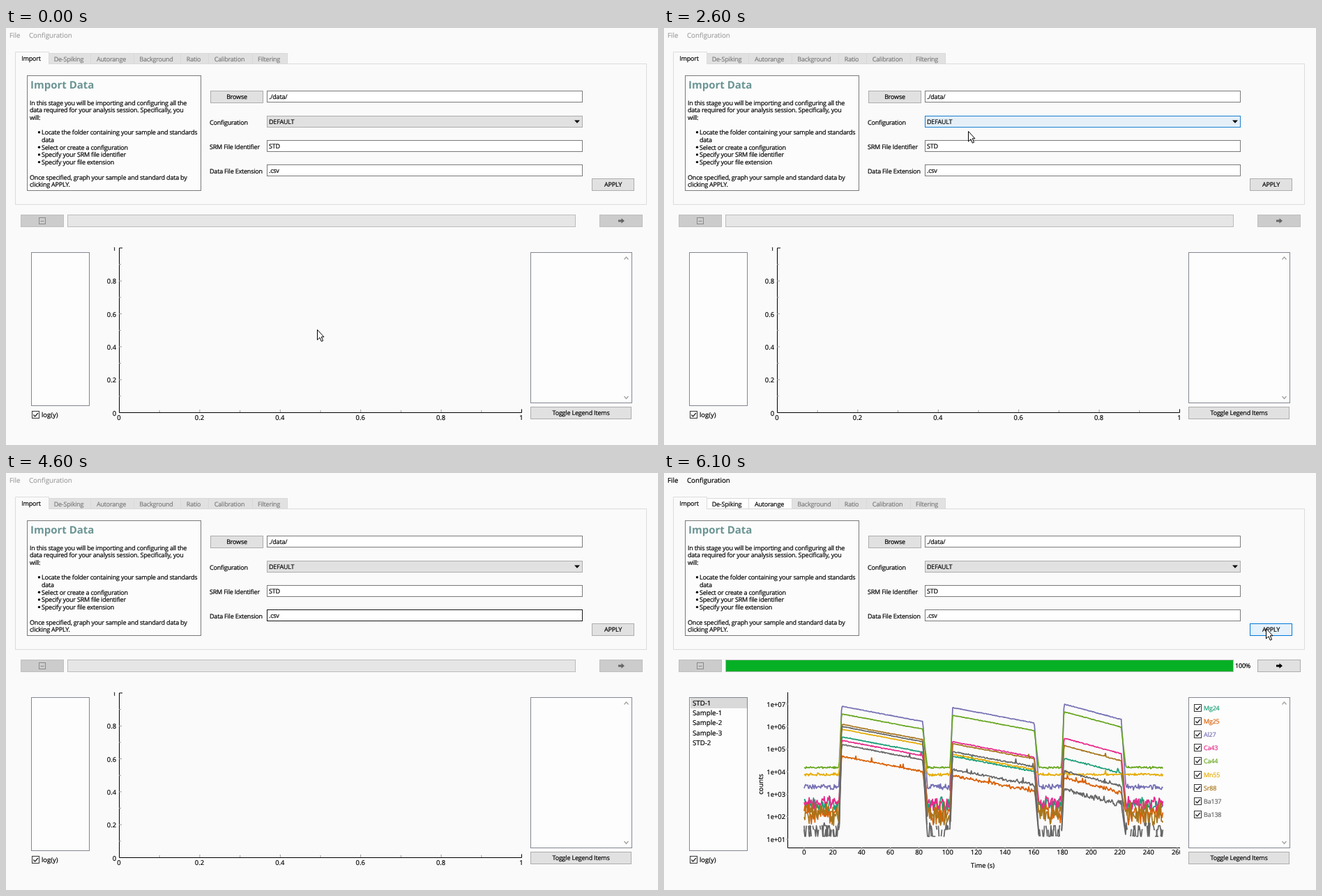
These frames come from a looping animation (935x599 px, 8 s). An HTML page:

```html
<!DOCTYPE html>
<html lang="en">
<head>
<meta charset="utf-8">
<title>Import Data</title>
<style>
  html, body { margin: 0; width: 100%; height: 100%; overflow: hidden; background: #fafafa; }
  svg { display: block; }
  text {
    font: 9px "Open Sans", "Noto Sans", sans-serif; letter-spacing: -.2px;
    fill: currentColor; stroke: currentColor; stroke-width: .2px;
    text-rendering: geometricPrecision; white-space: pre;
  }
  .big { font-size: 9.7px; letter-spacing: 0; }
  .axis { font-size: 9.4px; letter-spacing: 0; }
  .head { font-size: 15px; font-weight: 700; letter-spacing: 0; stroke: none; }
</style>
</head>
<body>
<svg id="stage" width="935" height="599" viewBox="0 0 935 599"></svg>
<script>
const LOOP = 8000, STEP = 100;
const BG = '#fafafa', FACE = '#e1e1e1', EDGE = '#adadad', FRAME = '#7a7a7a', MUTED = '#7c7c7c';
const stage = document.getElementById('stage');

// ---- drawing helpers ----
function add(parent, tag, attrs, content) {
  const el = document.createElementNS('http://www.w3.org/2000/svg', tag);
  for (const k in attrs) el.setAttribute(k, attrs[k]);
  if (content !== undefined) el.textContent = content;
  return parent.appendChild(el);
}
const group = (attrs = {}, parent = stage) => add(parent, 'g', attrs);
const box = (p, x, y, w, h, fill, stroke) =>
  add(p, 'rect', { x: x + .5, y: y + .5, width: w - 1, height: h - 1, fill, stroke });
const label = (p, x, y, str, cls = '', color = '#000', anchor = 'start') =>
  add(p, 'text', { x, y, class: cls, color, 'text-anchor': anchor }, str);
const line = (p, d, stroke = '#000', width = 1) =>
  add(p, 'path', { d, stroke, 'stroke-width': width, fill: 'none', 'stroke-linejoin': 'round' });
const shape = (p, d, fill = '#000') => add(p, 'path', { d, fill });

function checkbox(p, x, y) {
  box(p, x, y, 11, 11, '#fff', '#333');
  line(p, `M${x + 2.3} ${y + 5.5}l2.3 2.5 4.3-5`, '#222', 1.2);
}
function button(x, y, w, h, str) {
  const face = box(stage, x, y, w, h, FACE, EDGE);
  label(stage, x + w / 2, y + h / 2 + 3.3, str, '', '#000', 'middle');
  return face;
}

// ---- menu and tabs ----
const menu = [label(stage, 5, 14, 'File', 'big'), label(stage, 33, 14, 'Configuration', 'big')];

box(stage, 13, 51, 906, 203, BG, '#dcdcdc');
const tabEdges = [61, 121, 183, 250, 290, 353, 403];
const tabs = ['De-Spiking', 'Autorange', 'Background', 'Ratio', 'Calibration', 'Filtering'].map((name, i) => {
  const x = tabEdges[i], w = tabEdges[i + 1] - x;
  return {
    face: box(stage, x, 36, w + 1, 16, FACE, '#d9d9d9'),
    text: label(stage, x + w / 2 - 1, 47.5, name, '', MUTED, 'middle')
  };
});
shape(stage, 'M13 34H61V52H13Z', BG);
line(stage, 'M13.5 52V34.5H61.5V51.5', '#dcdcdc');
label(stage, 36, 47, 'Import', '', '#000', 'middle');

// ---- instructions ----
box(stage, 30, 68, 250, 166, '#fcfcfc', FRAME);
label(stage, 35, 87, 'Import Data', 'head', '#6b9594');
`In this stage you will be importing and configuring all the
data required for your analysis session. Specifically, you
will:

*Locate the folder containing your sample and standards
_data
*Select or create a configuration
*Specify your SRM file identifier
*Specify your file extension

Once specified, graph your sample and standard data by
clicking APPLY.`.split('\n').forEach((str, i) => {
  const y = 110.5 + 10.7 * i, item = /^[*_]/.test(str);
  label(stage, item ? 51 : 34, y, item ? str.slice(1) : str);
  if (str[0] === '*') add(stage, 'circle', { cx: 47.5, cy: y - 3.5, r: 1.7 });
});

// ---- form ----
const beam = group();
line(beam, 'M-3 -7.5H3M-3 7.5H3M0 -7.5V7.5', '#fff');

button(293, 90, 76, 18, 'Browse');
const field = (y, str) => {
  const face = box(stage, 374, y, 453, 17, '#fff', FRAME);
  label(stage, 377, y + 12.2, str);
  return face;
};
const data = field(90, './data/');
const combo = field(126, 'DEFAULT');
const srm = field(161, 'STD');
const ext = field(196, '.csv');
shape(stage, 'M815 132.5H823L819 136.8Z');
['Configuration', 'SRM File Identifier', 'Data File Extension'].forEach((str, i) =>
  label(stage, 292, 138.5 + 35 * i, str));
const apply = button(840, 216, 61, 18, 'APPLY');

// ---- progress row ----
box(stage, 21, 268, 62, 18, '#ccc', '#bfbfbf');
box(stage, 47, 272, 10, 10, 'none', '#8a8a8a');
line(stage, 'M49.5 277.5H54.5', '#8a8a8a');
box(stage, 88, 268, 729, 18, '#e6e6e6', '#bcbcbc');
const bar = add(stage, 'rect', { x: 89, y: 269, height: 16, fill: '#06b025' });
const percent = label(stage, 819, 280.3, '');
const next = box(stage, 851, 268, 62, 18, '#ccc', '#bfbfbf');
const arrow = shape(stage, 'M878 275.5H882.5V273.3L887 277L882.5 280.7V278.5H878Z');

// ---- side panels ----
box(stage, 36, 322, 84, 221, '#fdfdfd', '#828790');
checkbox(stage, 37, 550);
label(stage, 51, 558.7, 'log(y)', 'axis');
box(stage, 752, 322, 146, 217, '#fdfdfd', '#828790');
line(stage, 'M886.5 332.5L889.5 329L892.5 332.5M886.5 529L889.5 532.5L892.5 529', '#a0a0a0', 1.2);
button(752, 544, 145, 18, 'Toggle Legend Items');

// ---- empty plot ----
const clip = add(add(stage, 'defs', {}), 'clipPath', { id: 'clip' });
add(clip, 'rect', { x: 125, y: 315, width: 615, height: 260 });
const blank = group({ 'clip-path': 'url(#clip)' });
line(blank, 'M167 316H162.5V552.5H739.5V547.5');
for (let i = 0; i <= 10; i++) {
  const x = 162.5 + 57.7 * i, y = 552.5 - 23.65 * i;
  if (i % 10) line(blank, `M162 ${y}h${i % 2 ? 3 : 4}M${x} 552v${i % 2 ? -3 : -4}`, '#999');
  if (i % 2 === 0) {
    label(blank, 158, y + 4, i / 10, 'axis', '#000', 'end');
    label(blank, x - .5, 562.5, i / 10, 'axis', '#000', 'middle');
  }
}

// ---- loaded data ----
const loaded = group();
shape(loaded, 'M38 323H119V338H38Z', '#d9d9d9');
['STD-1', 'Sample-1', 'Sample-2', 'Sample-3', 'STD-2'].forEach((s, i) =>
  label(loaded, 41, 334 + 14.2 * i, s, 'big'));

const plot = group({ 'clip-path': 'url(#clip)' }, loaded);
const DECADE = 32.35, ONE = 522;
const px = sec => 201 + 2.0575 * sec;
line(plot, 'M177.5 315V538.5H740');
for (let e = 1; e <= 7; e++) {
  const y = 558.4 - DECADE * e;
  line(plot, `M178 ${y}h-3`, '#999');
  label(plot, 174, y + 3.7, '1e+0' + e, 'axis', '#000', 'end');
}
for (let s = 0; s <= 260; s += 20) {
  line(plot, `M${px(s)} 538v3`, '#999');
  label(plot, px(s), 548.3, s, 'axis', '#000', 'middle');
}
label(plot, 457, 567, 'Time (s)', 'axis', '#000', 'middle');
add(plot, 'text', { class: 'axis', 'text-anchor': 'middle', transform: 'translate(142 447) rotate(-90)' }, 'counts');

// base: level between pulses, top: start of the first pulse,
// rare: how much weaker the element is in the later pulses
const series = [
  { name: 'Mg24', color: '#1b9e77', base: 477, top: 379, rare: .5 },
  { name: 'Mg25', color: '#d95f02', base: 488, top: 407, rare: .5 },
  { name: 'Al27', color: '#7570b3', base: 451, top: 335, rare: 0 },
  { name: 'Ca43', color: '#e7298a', base: 474, top: 384, rare: 0 },
  { name: 'Ca44', color: '#66a61e', base: 423, top: 346, rare: 0 },
  { name: 'Mn55', color: '#e6ab02', base: 433, top: 368, rare: 1 },
  { name: 'Sr88', color: '#a6761d', base: 490, top: 361, rare: .5 },
  { name: 'Ba137', color: '#666666', base: ONE, top: 390, rare: 1 },
  { name: 'Ba138', color: '#666666', base: ONE, top: 364, rare: 1 }
];
const RISE = 1.8, FALL = 3.2, DROP = 22;
const pulses = [
  { on: 24.3, off: 82.7, shift: () => 0 },
  { on: 101.6, off: 160.4, shift: r => 2 + 34 * r ** .4 },
  { on: 179.3, off: 221, shift: r => -3 + 67 * r }
];

let seed = 11;
const rnd = () => (seed = seed * 16807 % 2147483647) / 2147483647;
const spread = () => rnd() + rnd() - 1;
// Counting noise: on a log scale it grows as the signal falls.
const noise = y => 1.5 * 10 ** ((y - 423) / DECADE / 2);

function trace({ color, base, top, rare }) {
  let d = '', pen = 'M';
  for (let s = 0; s <= 250; s += .5) {
    const p = pulses.find(q => s >= q.on && s <= q.off + FALL);
    let y = base;
    if (p) {
      const first = top + p.shift(rare), last = Math.min(base, first + DROP);
      const lit = (s - p.on - RISE) / (p.off - p.on - RISE);
      if (lit < 0) y += (first - base) * (s - p.on) / RISE;
      else if (lit > 1) y = last + (base - last) * (s - p.off) / FALL;
      else {
        y = Math.min(base, first + DROP * lit);
        y += spread() * (.5 + noise(y) * .7) - (y > 405 && rnd() < .03 ? 5 : 0);
      }
    } else if (base < ONE) y += spread() * noise(base) * 1.25;
    else {
      // A few counts at most; a zero has no logarithm and breaks the line.
      const count = Math.floor(rnd() * 3.2 * (.6 + rnd()));
      if (!count) { pen = 'M'; continue; }
      y -= DECADE * Math.log10(count);
    }
    d += pen + px(s).toFixed(1) + ' ' + Math.min(ONE, y).toFixed(1);
    pen = 'L';
  }
  line(plot, d, color, 1.7);
}
series.forEach((s, i) => {
  trace(s);
  checkbox(loaded, 760, 332 + Math.round(19.1 * i));
  label(loaded, 774, 341 + 19.1 * i, s.name, '', s.color);
});

// ---- pointer ----
const pointer = add(stage, 'path', {
  d: 'M.5 .5V15L4 11.7L6.3 17.2L8.6 16.2L6.3 10.8H10Z', fill: '#fff', stroke: '#000'
});

// ---- timeline ----
const START = { x: 446, y: 433 };
const moves = [
  { from: 400, to: 1080, x: 431, y: 98 },
  { from: 1600, to: 2100, x: 435, y: 135 },
  { from: 2400, to: 2900, x: 437, y: 171 },
  { from: 3200, to: 3600, x: 441, y: 204 },
  { from: 4300, to: 5300, x: 860, y: 223 },
  { from: 5900, to: 6100, x: 863, y: 223 }
];
const ACTIVE = 4700, LOAD = 5600, READY = 6100;

const clamp = v => Math.min(1, Math.max(0, v));
const ease = u => u * u * (3 - 2 * u);

function mouse(t) {
  let { x, y } = START;
  for (const m of moves) {
    const k = ease(clamp((t - m.from) / (m.to - m.from)));
    x += (m.x - x) * k;
    y += (m.y - y) * k;
  }
  return { x, y };
}
function inside(el, { x, y }) {
  const [l, t, w, h] = ['x', 'y', 'width', 'height'].map(k => el[k].baseVal.value);
  return x >= l && x <= l + w && y >= t && y <= t + h;
}
// Hover fades in and out: the share of the last half second spent over the element.
function hover(el, t) {
  let hits = 0;
  for (let back = 0; back < 500; back += 25) hits += inside(el, mouse(t - back));
  return hits / 20;
}
const mix = (a, b, k) => `rgb(${a.map((v, i) => Math.round(v + (b[i] - v) * k))})`;
const glow = (el, k) => {
  el.setAttribute('fill', mix([225, 225, 225], [229, 241, 251], k));
  el.setAttribute('stroke', mix([173, 173, 173], [0, 120, 215], k));
};
const darken = (el, k) => el.setAttribute('stroke', mix([122, 122, 122], [23, 23, 23], k));
const show = (el, on) => el.setAttribute('visibility', on ? 'visible' : 'hidden');

function render(t) {
  const { x, y } = mouse(t);
  const typing = [data, srm, ext].some(f => inside(f, mouse(t - 200)));
  (typing ? beam : pointer).setAttribute('transform', `translate(${Math.round(x)} ${Math.round(y)})`);
  show(beam, typing);
  show(pointer, !typing);

  [combo, apply].forEach(el => glow(el, hover(el, t)));
  [srm, ext].forEach(el => darken(el, hover(el, t)));
  menu.forEach(m => m.setAttribute('color', t < ACTIVE ? '#a3a3a3' : '#000'));

  const done = clamp((t - LOAD) / (READY - LOAD));
  bar.setAttribute('width', 727 * done);
  percent.textContent = done ? Math.round(done * 100) + '%' : '';

  const ready = t >= READY;
  show(blank, !ready);
  show(loaded, ready);
  tabs.slice(0, 2).forEach(tab => {
    tab.face.setAttribute('fill', ready ? '#fff' : FACE);
    tab.text.setAttribute('color', ready ? '#000' : MUTED);
  });
  next.setAttribute('fill', ready ? FACE : '#ccc');
  next.setAttribute('stroke', ready ? EDGE : '#bfbfbf');
  arrow.setAttribute('fill', ready ? '#000' : '#666');
}

function tick() {
  render(Math.floor(performance.now() % LOOP / STEP) * STEP);
  requestAnimationFrame(tick);
}
tick();
</script>
</body>
</html>
```
